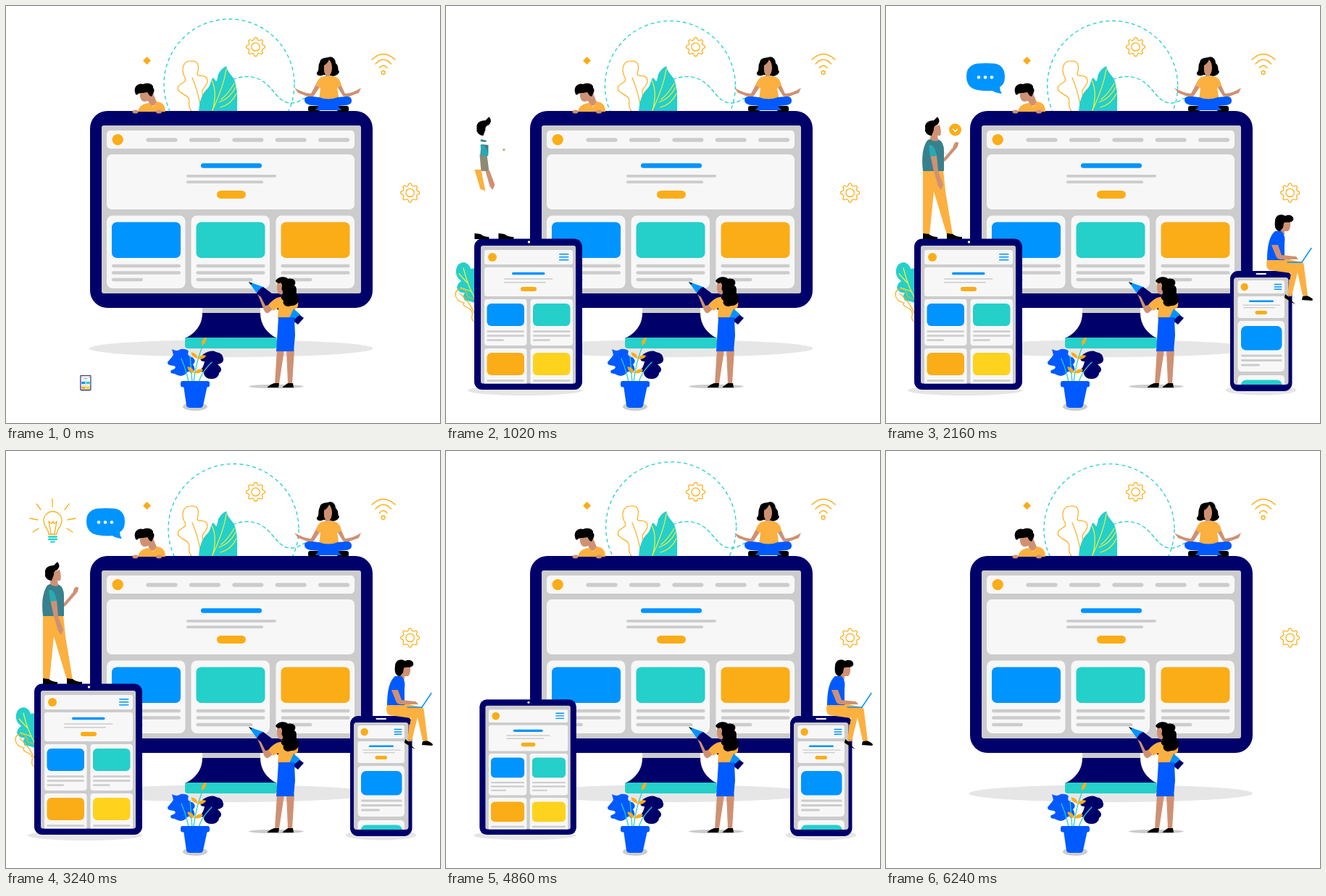
Animation, 599 px wide and 576 px high, one loop 8.94 s. Source, as an HTML page:

```html
<!DOCTYPE html>
<html lang="en">
<head>
<meta charset="utf-8">
<title>Responsive design</title>
<style>
html, body { margin: 0; width: 100%; height: 100%; overflow: hidden; background: #fff; }
svg { display: block; width: 100%; height: 100%; }
</style>
</head>
<body>
<svg id="stage" viewBox="0 0 599 576"></svg>
<script>
const NAVY = '#00006b', BLUE = '#0094ff', ROYAL = '#005aff', TEAL = '#25cfca',
  ORANGE = '#fbad18', SHIRT = '#fcb040', YELLOW = '#ffd21e', LIME = '#f5f03a',
  SKIN = '#cf9173', GREY = '#ccc', PALE = '#f7f7f7', SHADE = '#e6e6e6', BLACK = '#000';

// drawing helpers: boxes are given by their edges
const box = (x1, y1, x2, y2, r, fill) =>
  `<rect x="${x1}" y="${y1}" width="${x2 - x1}" height="${y2 - y1}" rx="${r}" fill="${fill}"/>`;
const bar = (x1, x2, y, h, fill = GREY) => box(x1, y - h / 2, x2, y + h / 2, h / 2, fill);
const oval = (x, y, rx, ry, fill) => `<ellipse cx="${x}" cy="${y}" rx="${rx}" ry="${ry}" fill="${fill}"/>`;
const disc = (x, y, r, fill) => oval(x, y, r, r, fill);
const shape = (d, fill) => `<path d="${d}" fill="${fill}"/>`;
const line = (d, color, w = 1.2, extra = '') =>
  `<path d="${d}" fill="none" stroke="${color}" stroke-width="${w}" stroke-linecap="round" stroke-linejoin="round" ${extra}/>`;
const group = (id, body) => `<g id="${id}">${body}</g>`;
const each = (list, fn) => list.map(fn).join('');

function gear(x, y) {
  let d = '';
  for (let i = 0; i < 32; i++) {
    const a = (i - 1.5) * Math.PI / 16 - Math.PI / 2, r = i % 4 === 1 || i % 4 === 2 ? 13 : 10;
    d += (i ? 'L' : 'M') + (x + r * Math.cos(a)).toFixed(1) + ' ' + (y + r * Math.sin(a)).toFixed(1);
  }
  return line(d + 'Z', ORANGE) + `<circle cx="${x}" cy="${y}" r="5.7" fill="none" stroke="${ORANGE}" stroke-width="1.2"/>`;
}

const menu = (x1, x2, y, gap) => each([0, 1, 2], i => bar(x1, x2, y + i * gap, 1.5, BLUE));

function backdrop() {
  return oval(310.5, 473, 196, 12, SHADE) +
    group('ring', `<circle cx="308" cy="108" r="90" fill="none" stroke="${TEAL}" stroke-width="1.3" stroke-dasharray="5 4"/>`) +
    line('M300 112C312 97 338 92 356 105C372 117 376 134 394 134C404 134 408 128 414 127', TEAL, 1.3, 'stroke-dasharray="4.5 4"') +
    shape('M194.5 70L200 75.5L194.5 81L189 75.5Z', ORANGE) +
    gear(344.5, 56.5) + gear(557.7, 258) +
    line('M505 74Q521 59 537 74M510 80Q521 68 531.5 80M515.5 85.5Q521 79 526 85.5', ORANGE, 1.4) +
    `<circle cx="520.7" cy="92" r="2.5" fill="none" stroke="${ORANGE}" stroke-width="1.3"/>`;
}

function topPlants() {
  return line('M256 145C249 138 256 131 251 126C246 121 234 119 238 111C241 105 250 107 247 99C243 93 241 76 255 76C268 75 266 87 264 93C263 100 277 92 278 103C279 110 269 114 271 120C274 126 268 134 268 145M257 99Q266 120 269 143', ORANGE) +
    shape('M266 146C267 132 270 121 279 113C283 108 282 102 286 99L290 104C293 102 291 95 295 91Q298 86 304 83C306 94 315 96 317 108C320 119 319 132 319 146Z', TEAL) +
    line('M304 87C301 108 293 127 284 146M284 103Q292 118 285 145M294 133Q309 128 317 112M296 140Q311 136 318 121M297 129Q306 122 315 107', LIME);
}

function peeker() {
  return shape('M185 120C184 131 190 134 196 131L200 139L209 135L202 118Z', SKIN) +
    shape('M178 119C176 110 184 106 189 108C196 105 204 108 203 113C207 117 202 122 201 125C197 124 197 121 195 119C188 121 183 119 181 123C178 122 179 121 178 119Z', BLACK) +
    shape('M182 146Q184 135 197 134L203 139L208 132Q220 133 220 146Z', SHIRT) +
    oval(178.5, 146, 4, 2.5, SKIN) + oval(211, 146, 4, 2.5, SKIN);
}

function yogi() {
  return shape('M430 104L421 121Q410 120 398 113L403 120L419 126Q425 126 427 121L437 106Z', SKIN) +
    shape('M460 104L468 121Q480 120 490 113L487 120L471 126Q465 126 463 121L454 106Z', SKIN) +
    shape('M433 78C434 71 441 72 444 71C451 68 455 74 455 79C460 83 457 87 460 91C458 96 452 98 447 96L438 95C434 98 428 96 429 92C433 89 430 82 433 78Z', BLACK) +
    shape('M439 82Q444 79 446 74Q450 78 450 86Q449 94 447 95V100H441V95Q438 91 439 82Z', SKIN) +
    shape('M439 97H449Q461 97 463 110L457 113L460 130H432L434 113L428 110Q430 98 439 97Z', SHIRT) +
    box(417, 138, 433, 146, 3, BLACK) + box(457, 138, 473, 146, 3, BLACK) +
    shape('M432 126C422 125 412 123 412 130C412 138 425 137 432 138L427 144H463L458 138C467 137 478 138 477 130C476 122 466 126 458 126Q445 131 432 126Z', ROYAL);
}

function monitor() {
  const cards = [[139, BLUE, 43], [255.5, TEAL, 78], [372.5, ORANGE, 43]];
  return box(271, 416, 351, 425, 0, GREY) +
    shape('M271 424H351C351 440 360 452 374 459H247C262 452 271 440 271 424Z', NAVY) +
    box(247, 458, 374, 473, 4, TEAL) +
    box(116, 145, 506, 417, 24, NAVY) + box(132, 165, 490, 397, 3, GREY) +
    box(139, 172, 481, 197, 5, PALE) + disc(154.2, 184.6, 7.7, ORANGE) +
    each([0, 1, 2, 3, 4], i => bar(193.5 + i * 59.4, 236.5 + i * 59.4, 185, 5.5)) +
    box(139, 205, 481, 281, 7, PALE) +
    bar(269, 353, 220.6, 6.5, BLUE) + bar(249, 373, 234.8, 3.8) + bar(249, 355, 243.2, 3.8) + bar(291, 331, 260.4, 11, ORANGE) +
    each(cards, ([x, c, w]) => box(x, 289.5, x + 108.5, 390, 8, PALE) + box(x + 7, 298.5, x + 102, 348, 7, c) +
      bar(x + 7, x + 102, 359, 4.6) + bar(x + 7, x + 102, 368.5, 4.6) + bar(x + 7, x + 7 + w, 378, 4.6));
}

function designer() {
  return oval(373, 525.5, 38, 2.8, GREY) +
    shape('M374 474L384 475L377 522H371ZM387 474H398L395 522H389Z', SKIN) +
    shape('M361 526Q364 523 370 521H377L376 527H361ZM382 526Q386 523 389 521H396L397 527H382Z', BLACK) +
    shape('M335 381L355 388L347 398Z', BLUE) + shape('M335 381L340 383L338 385Z', BLACK) +
    shape('M355 388L411 431L403 440L346 398Q348 391 355 388Z', NAVY) +
    shape('M347 398L352 402L358 414L366 412L374 404L379 410L362 424Q358 425 356 420L349 402Z', SKIN) +
    shape('M378 402H397Q405 405 403 415L397 421V432H375L376 417L369 421L362 413Q370 403 378 402Z', SHIRT) +
    shape('M397 418L406 426L399 432L391 431Z', BLUE) +
    shape('M376 430H398L399 455L397 477H373Z', ROYAL) +
    shape('M374 384Q375 377 383 380L390 389L386 404L379 403L381 398Q373 400 374 384Z', SKIN) +
    shape('M372 380C375 373 387 373 389 377C397 375 402 381 398 386C404 390 398 395 403 400C407 406 402 415 393 414C387 417 381 412 383 407C376 402 383 399 382 394C378 389 384 387 379 382Q375 385 372 380Z', BLACK);
}

function pot() {
  const leaf = (x, y, a) =>
    `<path transform="translate(${x} ${y}) rotate(${a})" d="M0 0Q-5 -7 0 -13Q5 -7 0 0Z" fill="${ORANGE}"/>`;
  return oval(261, 553.5, 17, 5.5, GREY) +
    shape('M229 474Q236 478 241 474Q249 473 252 477Q249 484 257 485Q264 490 258 495Q264 504 255 507Q253 502 248 508Q242 514 233 508Q225 508 228 503Q237 500 232 497Q222 497 223 492Q229 485 231 482Z', ROYAL) +
    shape('M272 481Q284 474 290 478Q299 479 300 487Q301 493 292 495Q301 502 294 507Q294 513 286 515Q275 516 273 508Q275 504 266 506Q273 499 274 491Q267 491 269 486Z', NAVY) +
    line('M242 487Q249 503 252 520M259 520Q262 488 275 462M284 492Q269 507 266 520M254 483L257 520', TEAL, 1.3) +
    leaf(270, 469, 28) + leaf(265, 487, -48) + leaf(264, 487, 72) + leaf(260, 507, -48) + leaf(260, 507, 68) +
    shape('M245 524H278L272 552Q271 555 268 555H254Q250 555 249 552Z', ROYAL) + box(241, 518, 281, 526.5, 3, ROYAL);
}

function tablet() {
  const card = (x, y, c) => box(x, y, x + 58.5, y + 64, 4, PALE) + box(x + 3.5, y + 6, x + 55, y + 37, 6, c) +
    bar(x + 3.5, x + 55, y + 44.5, 2.4) + bar(x + 3.5, x + 55, y + 50.5, 2.4) + bar(x + 3.5, x + 27, y + 56.5, 2.4);
  return oval(109, 531, 79, 7, SHADE) +
    box(39, 321.5, 188, 530, 11, NAVY) + box(48, 331, 179, 521.5, 3, GREY) + disc(114.5, 326, 1.7, '#fff') +
    box(53, 337, 175, 357, 3, PALE) + disc(64, 347, 6, ORANGE) + menu(156, 169.5, 342.7, 4) +
    box(53, 361, 175, 401, 3, PALE) + bar(91, 136.5, 369.5, 3.6, BLUE) + bar(80, 147.5, 377, 1.6) + bar(80, 138, 381.7, 1.6) + bar(103, 125, 391, 6, ORANGE) +
    card(53, 405, BLUE) + card(116.5, 405, TEAL) +
    `<g clip-path="url(#tabletClip)">${card(53, 473, ORANGE) + card(116.5, 473, YELLOW)}</g>`;
}

function phone() {
  return oval(517.5, 530.5, 49, 7, SHADE) +
    box(475, 366, 560.5, 532, 11, NAVY) + box(480, 375, 555.5, 523, 4, GREY) + bar(510.5, 525, 370, 2, '#fff') +
    box(485.5, 379, 550, 397, 3, PALE) + disc(494.7, 388, 5.2, ORANGE) + menu(535.5, 546.5, 384.5, 3.4) +
    box(485.5, 401, 550, 431, 3, PALE) + bar(501, 535, 407.8, 2.6, BLUE) + bar(492, 544.5, 413.2, 1.3) + bar(493, 537, 416.7, 1.3) + bar(509.5, 526, 423.5, 5, ORANGE) +
    box(485.5, 435, 550, 505, 5, PALE) + box(490, 442, 546.5, 475.5, 7, BLUE) +
    bar(490, 546.5, 483, 2.8) + bar(490, 546.5, 489.5, 2.8) + bar(490, 516, 496, 2.8) +
    `<g clip-path="url(#phoneClip)">${box(485.5, 510, 550, 535, 5, PALE) + box(490, 516.5, 546.5, 540, 7, TEAL)}</g>`;
}

function sideLeaves() {
  return shape('M42 412Q35 407 26 407Q22 401 26 396Q17 397 15 389Q16 383 21 380Q12 373 14 364Q16 354 25 354Q32 356 34 363L42 362Z', TEAL) +
    line('M24 362Q30 387 40 404M18 370L29 382M20 389L34 394', LIME) +
    line('M40 437Q34 433 36 428Q38 419 28 416Q22 413 25 410Q14 408 13 399Q13 390 23 391Q29 393 30 402L40 405M19 397Q32 408 39 424', ORANGE);
}

// the solid core of the figure shows first, the rest fades in between
function man() {
  const core = shape('M60 184L68 186L66 188L59 187ZM60 191L70 192L70 205H59Z', '#38808d') +
    shape('M58 205H68L71 228H60Z', '#8f8a74') + shape('M51 226H60L66 256L65 255L59 253Z', SHIRT);
  const body = shape('M51 226H79L82 256L92 316H84L66 256L60 317H51Z', SHIRT) +
    shape('M75 204L80 210L92 196L94 190Q97 186 100 189Q100 194 96 198L82 214Q77 216 73 210Z', SKIN) +
    shape('M62 184H72Q80 188 80 200V228H51Q48 202 55 189Q57 184 62 184Z', '#38808d') +
    shape('M61 205L70 206L72 229H66Z', SKIN) +
    shape('M62 168L74 164Q77 174 75 179H71L72 186Q66 188 61 184Z', SKIN);
  return core + group('body', body) +
    shape('M66 228H72L79 247L76 254L72 249Z', SKIN) + disc(91.5, 198.5, 1.5, SKIN) +
    shape('M59 192Q67 190 70 207L61 208Z', '#28aab2') +
    shape('M54 165Q56 158 66 158L71 153Q76 159 71 164Q65 166 66 171L63 179Q57 179 54 173Z', BLACK) +
    shape('M51 314L59 315Q64 319 71 319V322H51ZM84 314L92 315Q97 319 105 319V322H84Z', BLACK);
}

const badge = disc(95.5, 171, 8.5, ORANGE) + line('M92.5 170L95.5 173.5L98.5 170', '#fff', 1.2);

const bubble = shape('M126 79.5Q138 78.5 150 79.5Q164 82 164 98Q164 108 157 112Q157 117 160 121Q151 120 147 117Q137 118 126 116Q111 113 111 97Q111 82 126 79.5Z', BLUE) +
  each([128, 137, 146], x => disc(x, 98.5, 2.3, '#fff'));

function bulb() {
  let rays = '';
  for (const [x1, y1, x2, y2] of [[64, 66, 64, 77], [42, 73, 48, 81], [87, 73, 81, 81], [33, 93, 44, 95], [96, 93, 85, 95], [37, 112, 45, 107], [92, 112, 84, 107]])
    rays += `M${x1} ${y1}L${x2} ${y2}`;
  return line(rays, ORANGE, 1.3) +
    line('M59 115C59 107 52 105 52 96A12.5 12.5 0 0 1 77 96C77 105 70 107 70 115ZM62 114L59 97Q64 103 65 97Q66 103 70 97L67 114', ORANGE, 1.3) +
    bar(58, 71, 118.5, 2.6, TEAL) + bar(58, 71, 122, 2.4, TEAL) + bar(61, 68, 125.5, 2.2, TEAL);
}

function sitter() {
  return shape('M556 378L563 376L560 401H555Z', SKIN) +
    shape('M551 398L556 402Q560 408 565 412L561 410L550 403ZM575 401Q582 399 585 402Q591 405 588 407L574 406Z', BLACK) +
    shape('M526 349H551L574 354Q577 355 577 360L582 400H575L568 368L560 400L554 398L559 369L530 365Q523 363 526 349Z', SHIRT) +
    shape('M541 299L558 297Q559 308 555 311L550 311V316L540 314Z', SKIN) +
    shape('M537 311H546Q552 318 550 328V351H526Q526 320 537 311Z', ROYAL) +
    shape('M532 330L541 330L546 344L566 346L569 350L544 350Q539 349 538 345Z', SKIN) +
    shape('M537 297C537 289 545 286 551 290C556 287 564 290 562 296C558 301 552 297 549 300L548 306L544 311C537 311 536 304 537 297Z', BLACK) +
    line('M554 354H574L587 334.5', BLUE, 1.5);
}

const stage = document.getElementById('stage');
stage.innerHTML =
  `<clipPath id="tabletClip"><rect x="48" y="470" width="131" height="51.5"/></clipPath>
   <clipPath id="phoneClip"><rect x="480" y="508" width="75.5" height="15"/></clipPath>` +
  backdrop() + topPlants() + monitor() + peeker() + yogi() + designer() + pot() +
  group('leaves', sideLeaves()) + group('tablet', tablet()) + group('man', man()) + group('badge', badge) +
  group('bubble', bubble) + group('bulb', bulb()) + group('phone', phone()) + group('sitter', sitter());

const part = {};
stage.querySelectorAll('g[id]').forEach(g => part[g.id] = g);

const LOOP = 8940, STEP = 60, LAST = 6240;

// pops: start, end of entry, start, end of exit, then the fixed point
const pops = {
  tablet: [-118, 482, 4740, 5340, 109.5, 531],
  leaves: [480, 900, 4200, 4500, 42, 412],
  phone: [1260, 1800, 5640, 6200, 517.5, 531],
  bubble: [1740, 2100, 3900, 4200, 159, 121],
  badge: [1860, 2160, 2460, 2760, 95.5, 171],
  bulb: [2760, 3180, 3660, 4020, 64.5, 126]
};

const clamp = v => Math.min(1, Math.max(0, v));
const ramp = (t, a, b) => clamp((t - a) / (b - a));
const ease = p => p * p * (3 - 2 * p);
const span = (t, [a, b, c, d]) => ease(ramp(t, a, b)) * (1 - ease(ramp(t, c, d)));
const mix = (a, b, p) => a + (b - a) * p;

function place(id, x, y, scale = 1, ox = 0, oy = 0) {
  part[id].setAttribute('transform', `translate(${x + ox} ${y + oy}) scale(${scale}) translate(${-ox} ${-oy})`);
}
function fade(id, o) {
  part[id].setAttribute('opacity', o);
  part[id].style.display = o > 0 ? '' : 'none';
}

function draw(t) {
  const a = t / 6300 * 2 * Math.PI;
  place('ring', 3 - 3 * Math.cos(a), 3 * Math.sin(a));

  for (const id in pops) {
    const k = span(t, pops[id]);
    place(id, 0, 0, k, pops[id][4], pops[id][5]);
    part[id].style.display = k > .002 ? '' : 'none';
  }

  const m = ramp(t, 960, 1380) * (1 - ramp(t, 4020, 4440));
  fade('man', clamp(m * 8));
  fade('body', ramp(m, .15, .6));
  place('man', mix(-13.5, 0, m), 0);

  const s = ease(ramp(t, 1800, 2130));
  place('sitter', mix(36, 0, s), 0);
  fade('sitter', s * (1 - ramp(t, 5460, 5760)));
}

let start;
function tick(now) {
  if (start === undefined) start = now;
  const t = (now - start) % LOOP;
  draw(Math.min(LAST, Math.floor(t / STEP) * STEP));
  requestAnimationFrame(tick);
}
draw(0);
requestAnimationFrame(tick);
</script>
</body>
</html>
```
